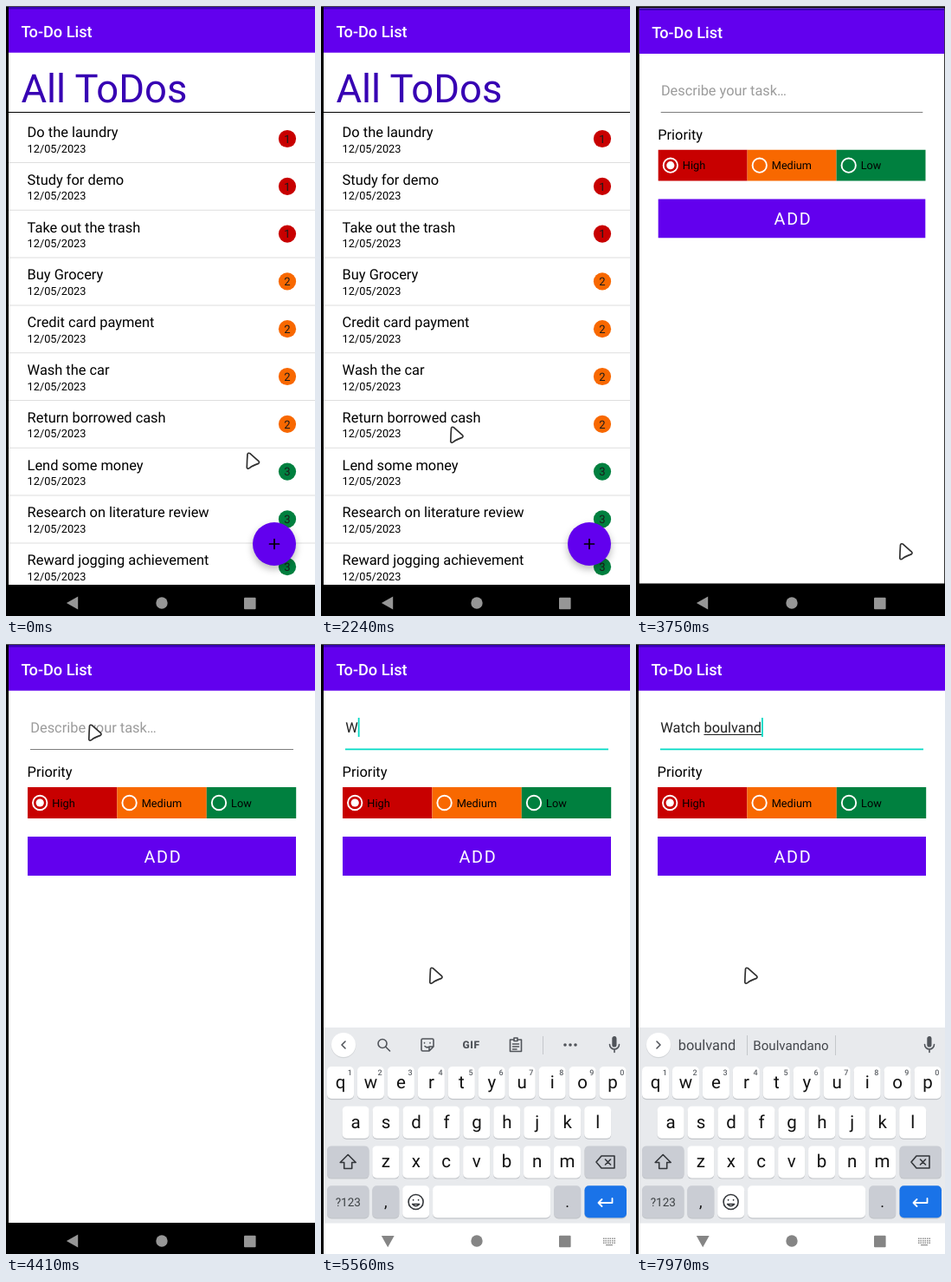
Write an HTML page with a canvas that moves like this. It is 357 by 703 pixels and loops after 8000 ms.

```html
<!DOCTYPE html>
<html lang="en">
<head>
<meta charset="utf-8">
<title>To-Do List</title>
<style>
  html, body { margin: 0; width: 100%; height: 100%; overflow: hidden; background: #000; }
  canvas { display: block; width: 357px; height: 703px; }
</style>
</head>
<body>
<canvas id="stage"></canvas>
<script>
const W = 357, H = 703, LOOP = 8000;
const canvas = document.getElementById('stage');
const ctx = canvas.getContext('2d');
const dpr = window.devicePixelRatio || 1;
canvas.width = W * dpr;
canvas.height = H * dpr;
ctx.textRendering = 'geometricPrecision';

const PURPLE = '#6200ee', DEEP = '#3700b3', TEAL = '#03dac5', INK = '#000';
const PRIORITY = ['#c80000', '#f86800', '#00803f'];
const BODY = 16.4, SMALL = 12.75;
const TODOS = [
  ['Do the laundry', 1], ['Study for demo', 1], ['Take out the trash', 1],
  ['Buy Grocery', 2], ['Credit card payment', 2], ['Wash the car', 2],
  ['Return borrowed cash', 2], ['Lend some money', 3],
  ['Research on literature review', 3], ['Reward jogging achievement', 3]
];

// Drawing helpers
function rect(x, y, w, h, color, radius = 0) {
  ctx.fillStyle = color;
  ctx.beginPath();
  ctx.roundRect(x, y, w, h, radius);
  ctx.fill();
}

function disc(x, y, r, color) {
  ctx.fillStyle = color;
  ctx.beginPath();
  ctx.arc(x, y, r, 0, Math.PI * 2);
  ctx.fill();
}

function text(str, x, y, size, color = INK, { align = 'left', weight = 400, spacing = 0 } = {}) {
  ctx.font = `${weight} ${size}px Roboto, sans-serif`;
  ctx.letterSpacing = spacing + 'px';
  ctx.textAlign = align;
  ctx.fillStyle = color;
  ctx.fillText(str, x, y);
  return ctx.measureText(str).width;
}

function icon(path, x, y, { stroke, fill, width = 1.7, angle = 0 }) {
  const shape = new Path2D(path);
  ctx.save();
  ctx.translate(x, y);
  ctx.rotate(angle);
  ctx.lineJoin = ctx.lineCap = 'round';
  ctx.lineWidth = width;
  if (fill) { ctx.fillStyle = fill; ctx.fill(shape); }
  if (stroke) { ctx.strokeStyle = stroke; ctx.stroke(shape); }
  ctx.restore();
}

// Typing: each letter appears at once, its underline and suggestions one beat later
const TYPED = 'Watch boulvand', FIRST = 6;
const typeAt = i => i < FIRST ? 5560 + i * 144 : 6840 + (i - FIRST) * 140;
const settleAt = i => i === FIRST - 1 ? 6560 : typeAt(i) + (i < FIRST ? 144 : 140);
const countUntil = (t, timeOf) => [...TYPED].filter((_, i) => t >= timeOf(i)).length;
const GUESSES = [
  ['We', 'What'], ['Was', 'Want'], ['Water', 'Watch'], ['Watch', 'Watched'], ['Watching', 'Watched'],
  ['the', 'a'],
  ['be', 'but'], ['both', 'book'], ['bought', 'bound'], ['could', 'would']
];

function suggestions(count) {
  const guess = GUESSES[count - 1] || ['Boulvandano', ''];
  const word = count === FIRST ? 'it' : TYPED.slice(count < FIRST ? 0 : FIRST, count);
  return [word, ...guess];
}

// Pointer track: positions held from step to step
const track = [[0, 277.5, 514]];
const ease = p => p ** 1.4;

function move(start, end, steps, x, y) {
  const [, x0, y0] = track.at(-1);
  for (let i = 1; i <= steps; i++) {
    const p = ease(i / steps);
    const time = steps > 1 ? start + (end - start) * (i - 1) / (steps - 1) : start;
    track.push([time, x0 + (x - x0) * p, y0 + (y - y0) * p]);
  }
}
move(1310, 2240, 8, 149, 484);
move(2520, 2520, 1, 121, 481);
move(2655, 2790, 2, 305, 618);
move(3170, 3170, 1, 305, 619);
move(3750, 3750, 1, 304, 618.5);
move(3900, 4410, 5, 95, 92);
move(4560, 4560, 1, 97, 105);
move(4710, 4710, 1, 108, 235);
move(4860, 4860, 1, 125, 372);

function drawPointer(t) {
  const [, x, y] = track.findLast(k => t >= k[0]);
  icon('M1.5 2.5Q1 10 .8 18Q1.5 20.2 4 18.4Q7 15.8 14 13.4Q16 12.2 14.2 10.3L4.6 1.8Q2.4 .4 1.5 2.5Z',
    x, y, { fill: '#fff', stroke: '#303030', width: 1.7 });
}

function drawPage() {
  rect(3, 1, 354, 666, '#fff');
  rect(3, 1, 354, 3, DEEP);
  rect(3, 3.5, 354, 50.2, PURPLE);
  text('To-Do List', 17.4, 36, 18.2, '#fff', { weight: 500 });
}

function drawList(t) {
  drawPage();
  text('All ToDos', 17.4, 111, 45.4, DEEP);
  rect(3, 122, 354, 1, INK);
  ctx.save();
  ctx.beginPath();
  ctx.rect(3, 1, 354, 666);
  ctx.clip();
  TODOS.forEach(([title, level], i) => {
    const y = 123 + i * 54.8;
    text(title, 24.6, y + 28, BODY);
    text('12/05/2023', 24.6, y + 45.5, SMALL);
    disc(325, y + 30, 10.1, PRIORITY[level - 1]);
    text(level, 325, y + 34.7, 13, '#1a1a1a', { align: 'center' });
    rect(3, y + 57, 354, 1, '#dedede');
  });
  const hover = t >= 2790;
  ctx.shadowColor = 'rgba(0,0,0,.28)';
  ctx.shadowBlur = (hover ? 11 : 8) * dpr;
  ctx.shadowOffsetY = (hover ? 5 : 4) * dpr;
  disc(310, 620, 25, hover ? '#5900d8' : PURPLE);
  ctx.restore();
  icon('M-5.5 0H5.5M0 -5.5V5.5', 310, 620, { stroke: INK });
}

function drawField(t) {
  const focused = t >= 4560;
  const count = countUntil(t, typeAt), settled = countUntil(t, settleAt);
  let caret = 28.2;
  if (count) caret += text(TYPED.slice(0, count), 28.2, 102, BODY, '#212121');
  else text('Describe your task…', 28.2, 102, BODY, '#9b9b9b');
  if (!focused) return rect(28, 121, 304, 1, '#7d7d7d');

  rect(28, 120.5, 304, 1.8, TEAL);
  if (t < 5130 || count) rect(caret, 85, 1.8, 22, TEAL);
  if (settled && settled !== FIRST) {
    const from = settled < FIRST ? 0 : FIRST;
    const lead = ctx.measureText(TYPED.slice(0, from)).width;
    const width = ctx.measureText(TYPED.slice(from, settled)).width;
    rect(28.2 + lead, 104, width, 1, '#212121');
  }
}

function drawForm(t) {
  drawPage();
  drawField(t);
  text('Priority', 24.6, 153, BODY);
  ['High', 'Medium', 'Low'].forEach((label, i) => {
    const x = 25 + i * 103.4;
    rect(x, 165, 103.4, 36, PRIORITY[i]);
    ctx.strokeStyle = '#fff';
    ctx.lineWidth = 1.9;
    ctx.beginPath();
    ctx.arc(x + 14.2, 183, 8.2, 0, Math.PI * 2);
    ctx.stroke();
    if (!i) disc(x + 14.2, 183, 4.6, '#fff');
    text(label, x + 28.3, 187.8, SMALL);
  });
  rect(25, 222, 310, 45, PURPLE);
  text('ADD', 181.5, 252, 19.8, '#fff', { align: 'center', spacing: 1.7 });
}

function drawToolbar(settled) {
  const gray = '#50545a', line = { stroke: gray, width: 1.6 };
  disc(26, 463, 14.3, '#d5d7da');
  disc(26, 462, 14, '#fff');
  icon(settled ? 'M-2 -4L2 0L-2 4' : 'M2 -4L-2 0L2 4', 26, 462, line);
  icon('M-2 -9.5A2.6 2.6 0 0 1 3 -8.5V-1A2.6 2.6 0 0 1 -2.2 -1V-8.5Z', 338.5, 463, { fill: gray });
  icon('M-5 -1.5A5.3 5.3 0 0 0 6 -1.5M.5 4V7.5', 338.5, 463, line);

  if (settled) {
    suggestions(settled).forEach((word, i) => {
      const size = word.length > 9 ? 15.1 : BODY;
      text(word, 82 + i * 97, 468, size, '#44474c', { align: 'center' });
    });
    rect(128, 451, 1, 23, '#c4c7cb');
    rect(230, 451, 1, 23, '#c4c7cb');
    return;
  }
  icon('M4 -1.5A5 5 0 1 1 -6 -1.5A5 5 0 1 1 4 -1.5M2.7 2.2L7.5 7', 72, 462, line);
  icon('M-5.5 -7H5.5Q7 -7 7 -5.5V2L2 7H-5.5Q-7 7 -7 5.5V-5.5Q-7 -7 -5.5 -7ZM2 7V2H7M-3.5 -2.5V-2M3 -2.5V-2M-3 1.5Q-1 3.5 1 2.5', 123, 462, line);
  text('GIF', 173.5, 466.3, 12, gray, { align: 'center', weight: 900, spacing: .6 });
  icon('M-2 -6H-6.5V7.5H6.5V-6H2M-2 -8H2V-4.5H-2ZM-3.5 -1H3.5M-3.5 2H3.5M-3.5 5H1', 225, 462, line);
  rect(256, 452, 1, 21, '#c4c7cb');
  [-6, 0, 6].forEach(dx => disc(288 + dx, 462, 1.8, gray));
}

function key(x, y, width, label, { color = '#fff', size = 20.5, ink = '#111', dy = 6.5 } = {}) {
  rect(x, y + 1.2, width, 37, '#c3c6ca', 5);
  rect(x, y, width, 37, color, 5);
  if (label) text(label, x + width / 2, y + 18.5 + dy, size, ink, { align: 'center' });
}

function drawKeyboard(t) {
  const dim = '#cacdd4', pitch = 34.95;
  const letters = (row, x0, y) => [...row].forEach((c, i) => key(x0 + i * pitch, y, 31, c));
  rect(3, 442, 354, 226, '#e8eaed');
  rect(3, 667.5, 354, 100, '#fff');
  drawToolbar(countUntil(t, settleAt));

  letters('qwertyuiop', 7, 487);
  [...'1234567890'].forEach((n, i) =>
    text(n, 33.2 + i * pitch, 497, 9, '#5f6368', { align: 'center', weight: 500 }));
  letters('asdfghjkl', 24.6, 532.7);
  key(7, 578.4, 48.5, '', { color: dim });
  letters('zxcvbnm', 59.3, 578.4);
  key(304.5, 578.4, 48.5, '', { color: dim });
  key(7, 624.3, 48.5, '?123', { color: dim, size: 13.5, ink: '#3c4043', dy: 5 });
  key(59.3, 624.3, 31, ',', { color: dim, size: 18 });
  key(94.2, 624.3, 31, '');
  key(129.1, 624.3, 136, '');
  key(269.2, 624.3, 31, '.', { color: dim, size: 18 });
  key(304.5, 624.3, 48.5, '', { color: '#1a73e8' });

  const line = { stroke: '#33363a', width: 1.6 };
  icon('M0 -8.5L-9 .5H-4.5V7.5H4.5V.5H9Z', 31.2, 597, line);
  icon('M-4.5 -7H10.5V7H-4.5L-10.5 0ZM0 -3L6 3M6 -3L0 3', 328.5, 597, line);
  icon('M8.5 0A8.5 8.5 0 1 1 -8.5 0A8.5 8.5 0 1 1 8.5 0M-3 -2.5V-2M3 -2.5V-2M-4 2.5Q0 7 4 2.5Z', 109.6, 643, line);
  icon('M8 -4V1H-8M-4 -3L-8 1L-4 5', 328.5, 643, { stroke: '#fff', width: 1.8 });
}

function drawNav(t) {
  const gray = t < 4560 ? '#969696' : '#858585';
  const turn = t < 4710 ? 0 : t < 4860 ? Math.PI / 4 : Math.PI / 2;
  icon('M-7.3 0L6 -7.4V7.4Z', 77.2, 688, { fill: gray, angle: -turn });
  disc(180, 688, 6.7, gray);
  rect(275, 681.7, 13.6, 13.6, gray, 1);
  if (t < 4860) return;
  for (let row = 0; row < 3; row++)
    for (let col = 0; col < 6; col++) rect(326 + col * 2.5, 684.5 + row * 2.5, 1.5, 1.4, '#8d8d8d');
  rect(329, 692, 8, 1.2, '#8d8d8d');
}

function drawScaled(scale, draw, t) {
  ctx.save();
  ctx.beginPath();
  ctx.rect(3, 1, 354, 666);
  ctx.clip();
  ctx.translate(180, 335);
  ctx.scale(scale, scale);
  ctx.translate(-180, -335);
  draw(t);
  ctx.restore();
}

function render(t) {
  ctx.setTransform(dpr, 0, 0, dpr, 0, 0);
  rect(0, 0, W, H, '#000');
  if (t < 3600) drawList(t);
  else if (t < 3750) {
    drawScaled(1.06, drawList, t);
    drawScaled(0.95, drawForm, t);
  } else drawScaled(t < 3900 ? 0.9955 : 1, drawForm, t);

  if (t >= 4560) {
    ctx.save();
    ctx.translate(0, t < 4710 ? 150 : t < 4860 ? 43 : 0);
    drawKeyboard(t);
    ctx.restore();
  }
  drawNav(t);
  rect(0, 0, 3, H, '#000');
  rect(0, 0, W, 1, '#4c4c50');
  drawPointer(t);
}

const start = performance.now();
function tick() {
  render((performance.now() - start) % LOOP);
  requestAnimationFrame(tick);
}
tick();
</script>
</body>
</html>
```
